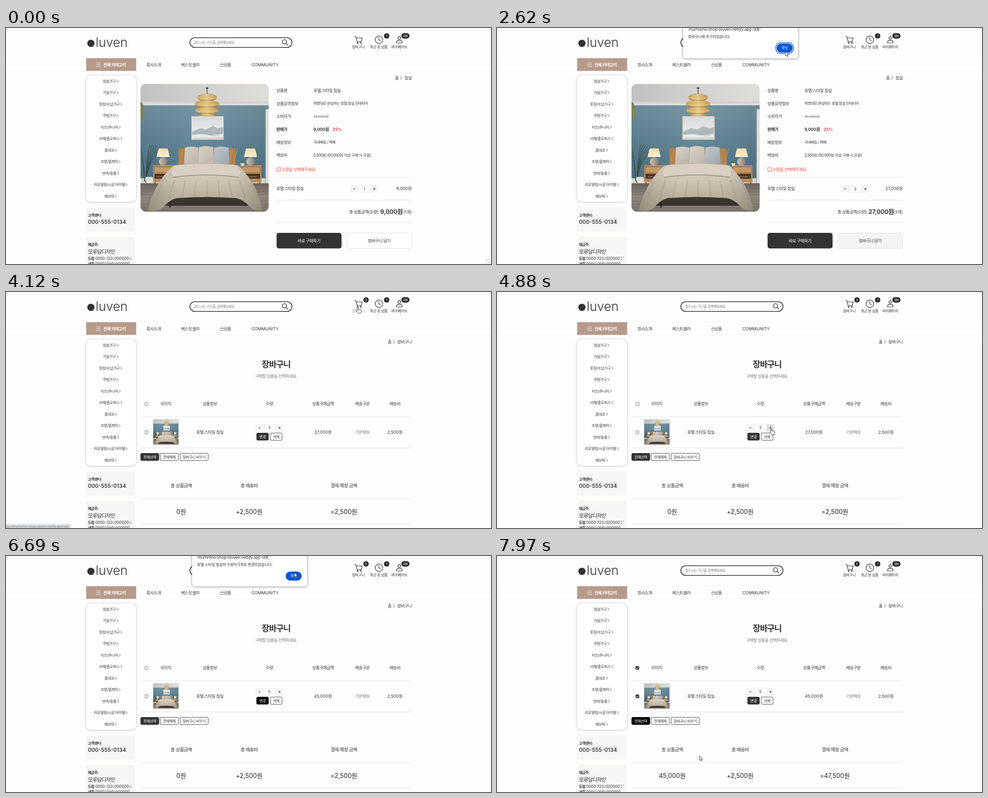
These frames come from a looping animation (1071x523 px, 8 s). An HTML page with a canvas:

```html
<!DOCTYPE html>
<html lang="ko">
<head>
<meta charset="utf-8">
<title>Shop cart demo</title>
<style>
html, body { margin: 0; width: 100%; height: 100%; overflow: hidden; background: #fefefe; }
canvas { display: block; }
</style>
</head>
<body>
<canvas id="stage" width="1071" height="523"></canvas>
<script>
const g = document.getElementById('stage').getContext('2d');
const LOOP = 8000;
const KR = '"Noto Sans CJK KR", "Noto Sans CJK JP", "Noto Sans CJK", sans-serif';
const BODY = 'Inter, ' + KR;
const DIALOG = '"Noto Sans", ' + KR;
const HOST = 'mumreno-shop-oluven.netlify.app';
const INK = '#333';
const ITEM = '호텔 스타일 침실';

// Drawing helpers
function text(s, x, y, size, { c = INK, w = 400, a = 'left', ls = -0.06, f = BODY } = {}) {
  g.font = `${w} ${size}px ${f}`;
  g.letterSpacing = size * ls + 'px';
  g.textAlign = a;
  g.fillStyle = c;
  g.fillText(s, x, y + size * 0.37);
  return g.measureText(s).width;
}
const num = (s, x, y, size, o) => text(s, x, y, size, { ls: 0, ...o });
const mid = (s, x, y, size, o) => text(s, x, y, size, { a: 'center', ...o });

function paint(p, fill, stroke, lw = 1) {
  if (fill) { g.fillStyle = fill; g.fill(p); }
  if (stroke) { g.strokeStyle = stroke; g.lineWidth = lw; g.stroke(p); }
}
function box(x, y, w, h, r, fill, stroke, lw) {
  const p = new Path2D();
  p.roundRect(x, y, w, h, r);
  paint(p, fill, stroke, lw);
}
function oval(x, y, rx, ry, fill, stroke, lw) {
  const p = new Path2D();
  p.ellipse(x, y, rx, ry, 0, 0, Math.PI * 2);
  paint(p, fill, stroke, lw);
}
const path = (d, fill, stroke, lw) => paint(new Path2D(d), fill, stroke, lw);
const chevron = (x, y) => path(`M${x} ${y - 3.2}l3.2 3.2l-3.2 3.2`, null, INK, 0.9);
const rule = (x, y, w, c = '#e2e2e2') => { g.fillStyle = c; g.fillRect(x, y, w, 1); };

function grad(x0, y0, x1, y1, ...colors) {
  const l = g.createLinearGradient(x0, y0, x1, y1);
  colors.forEach((c, i) => l.addColorStop(i / (colors.length - 1), c));
  return l;
}
function shadowBox(x, y, w, h, r, blur, color) {
  g.save();
  g.shadowColor = color;
  g.shadowBlur = blur;
  g.shadowOffsetY = 0.5;
  box(x, y, w, h, r, '#fff');
  g.restore();
}
const won = n => n.toLocaleString('en-US') + '원';
const within = (t, a, b) => t >= a && t < b;

// Timing
const ROUTE = [
  [400, 1054, 521], [820, 825, 358], [960, 825, 358], [1030, 815, 358], [1560, 815, 358],
  [1820, 824, 475], [2080, 824, 475], [2350, 836, 462], [2410, 836, 462], [2600, 637, 52],
  [2770, 637, 52], [3170, 770, 52], [3240, 777, 34], [4120, 777, 34], [4850, 606, 303],
  [5630, 606, 303], [5830, 566, 318], [6150, 566, 318], [6410, 604, 150], [6480, 604, 150],
  [6650, 637, 37], [6810, 637, 37], [7240, 225, 363], [7300, 190, 365], [7560, 309, 363],
  [7910, 309, 363], [7970, 447, 443], [LOOP, 447, 443]
];
const CLICKS = [[1030, 1090], [1220, 1290], [1950, 2020], [2710, 2770], [3580, 3660],
  [5150, 5210], [5290, 5350], [6000, 6070], [6760, 6810], [7690, 7750]];
const HAND = [[790, 1600], [1740, 2080], [3210, 4180], [4780, 5660], [5760, 6150], [7520, 7930]];
const ALERT_1 = [2080, 2770], ALERT_2 = [6150, 6810];
const during = (t, spans) => spans.some(([a, b]) => within(t, a, b));

function pointer(t) {
  const i = ROUTE.findIndex(k => k[0] > t);
  const [t0, x0, y0] = ROUTE[i - 1], [t1, x1, y1] = ROUTE[i];
  const u = (t - t0) / (t1 - t0), e = u * u * (3 - 2 * u);
  return [x0 + (x1 - x0) * e, y0 + (y1 - y0) * e];
}

// Bedroom picture, drawn at its large position
function bedside(x) {
  box(x, 304, 46, 38, 1, '#b88c5c');
  box(x + 3, 308, 40, 12, 0, '#c49a68', '#7d5a38', 0.7);
  box(x + 3, 323, 40, 11, 0, '#4a3728');
  rule(x + 8, 329, 28, '#a89c8c');
  path(`M${x + 4} 342v5m38-5v5`, null, '#59402b', 2);
}
function tableLamp(x) {
  oval(x, 296, 9.5, 9, grad(x - 9, 0, x + 9, 0, '#c9c2b7', '#aaa297', '#857d73'));
  path(`M${x - 10} 267h20l4.5 19h-29z`, grad(0, 267, 0, 286, '#f2dcae', '#fdf0cf'));
}
function pillow(x, w, y, light, dark) {
  path(`M${x + 2} ${y + 2}Q${x + w / 2} ${y - 3} ${x + w - 2} ${y + 2}Q${x + w - 1} ${y + 20} ${x + w} ${y + 39}` +
    `Q${x + w / 2} ${y + 43} ${x} ${y + 39}Q${x + 1} ${y + 20} ${x + 2} ${y + 2}z`,
    grad(x, y, x + w, y + 40, light, dark), 'rgba(110,100,90,.3)', 0.7);
}
function bedroom() {
  box(297, 124, 283, 221, 0, grad(0, 171, 0, 335, '#7393a0', '#66899a', '#587c8d', '#527485'));
  box(297, 171, 283, 164, 0, grad(297, 0, 580, 0, 'rgba(40,65,75,.1)', 'rgba(150,180,190,.14)', 'rgba(40,65,75,.12)'));
  box(297, 124, 283, 44, 0, grad(297, 124, 580, 160, '#c0c1c0', '#d2d1cf', '#e0ded9'));
  box(297, 163, 283, 8, 0, grad(0, 163, 0, 171, '#cccdcb', '#e4e4e1'));
  rule(297, 171, 283, '#8fa0a6');
  box(297, 333, 283, 12, 0, '#d6d6d2');
  box(574, 180, 6, 165, 0, '#dddedb');
  box(572.5, 180, 1.5, 165, 0, '#9aa6a8');
  box(297, 344, 283, 63, 0, grad(0, 344, 0, 407, '#6e655e', '#8e867e', '#7b736b'));
  for (let i = 0; i < 9; i++) rule(297, 348 + i * 7, 283, 'rgba(50,43,39,.18)');

  // Plants
  for (let i = 0; i < 7; i++) {
    path(`M309 343Q${310 + i} ${285 - i} ${318 + i * 5} ${258 + i * i * 0.5}`, null, '#33463f', 0.9);
    path(`M306 340Q304 300 ${298 + i} ${266 + i * 9}`, null, '#39483d', 0.8);
  }
  path('M297 163q7 4 7 16q4 10-2 26l-5-6z', '#7d8359');
  path('M308 330h16l-2 14h-12z', '#e3dfd7');

  // Pendant and framed print
  path('M444 132v17', null, '#333', 1.2);
  oval(444, 133, 3, 1.5, '#333');
  for (let i = 0; i < 4; i++) {
    const y = 154 + i * 14.5, r = [22, 27, 26, 20][i];
    oval(444, y, r, 8, grad(444 - r, 0, 444 + r, 0, '#c79f5c', '#e6c985', '#bd9350'), '#a98142', 0.6);
    path(`M${444 - r} ${y}Q444 ${y + 5} ${444 + r} ${y}`, null, '#f1dda8', 0.8);
    path(`M${447 - r} ${y + 4}Q444 ${y + 9} ${441 + r} ${y + 4}`, null, 'rgba(130,94,42,.5)', 1);
  }
  box(409.5, 195.5, 71, 52, 0, '#e6e8e8', '#b9a58c', 1.2);
  box(411, 197, 68, 49, 0, grad(0, 197, 0, 246, '#d5dadd', '#e4e6e6', '#c8cdcf'));
  path('M411 230l18-8l13 3l14-8l12 5l11-2v14l-30 4l-38-2z', 'rgba(146,158,164,.6)');
  path('M411 238q22-6 38 0t30-3v7l-68 2z', 'rgba(238,240,240,.8)');

  // Furniture
  bedside(325); bedside(518);
  tableLamp(347); tableLamp(540);
  path('M518 299h8l-1 6h-6z', '#f0eee9');
  oval(522, 297, 4, 3, '#53704c');
  box(381, 267, 126, 50, 2, '#b58149');
  for (let i = 0; i < 13; i++) path(`M${382 + i * 10} 303l9-36`, null, '#c99a60', 1);

  // Bed
  box(346, 366, 196, 28, 2, '#3a3330');
  path('M362 376v22M528 376v18', null, '#29221f', 3);
  pillow(393, 34, 263, '#d6d0c7', '#b9b1a6');
  pillow(458, 36, 263, '#c2c9cd', '#99a4ab');
  pillow(424, 36, 262, '#d9d2c8', '#bdb4a8');
  const duvet = 'M370 305Q444 295 514 305Q530 322 545 344Q560 372 566 403Q552 408 540 398Q526 381 508 377' +
    'Q444 372 376 377Q358 383 346 399Q330 409 313 404Q320 374 336 346Q350 322 370 305z';
  path(duvet, grad(0, 300, 0, 405, '#d6cdbe', '#cbc1b0', '#b5ab9a', '#a39988'));
  path(duvet, grad(313, 0, 566, 0, 'rgba(90,80,66,.22)', 'rgba(255,250,238,.1)', 'rgba(255,250,238,.08)', 'rgba(90,80,66,.26)'));
  path('M374 304Q444 296 510 304Q524 320 514 330Q444 320 368 330Q360 318 374 304z', '#d9d0c1', '#aea390', 0.7);
  path('M368 331Q444 321 514 331', null, 'rgba(100,88,72,.35)', 2);
  for (let i = 0; i < 9; i++) {
    const x = 348 + i * 24;
    path(`M${x} 337Q${x - 8 + i * 2} 355 ${x - 16 + i * 4} 378`, null, 'rgba(110,98,82,.14)', 3);
  }
}
function picture(x, y, scale, r) {
  g.save();
  g.translate(x, y);
  g.scale(scale, scale);
  g.translate(-297, -124);
  const clip = new Path2D();
  clip.roundRect(297, 124, 283, 283, r);
  g.clip(clip);
  bedroom();
  g.restore();
}

// Shared page parts
function badge(s, x, w = 12) {
  box(x - w / 2, 11.5, w, 12, 6, '#2b2b2b');
  num(s, x, 17.5, 6.4, { c: '#fff', w: 500, a: 'center' });
}
function header(t) {
  rule(0, 5, 1071, '#e4e4e4');
  rule(0, 66, 1071, '#f3f3f3');
  rule(0, 95, 1071, '#f3f3f3');

  oval(187.5, 34, 8, 8, INK);
  text('luven', 198, 31.6, 28, { w: 300, ls: 0 });

  box(406, 21.5, 225.5, 21.5, 10.75, '#fff', '#2b2b2b', 1.5);
  text('찾으시는 가구를 검색해보세요.', 415, 32.5, 7.7, { c: '#777' });
  oval(615, 30.5, 4.8, 4.8, null, '#222', 1.3);
  path('M618.6 34.2l4 4', null, '#222', 1.4);

  path('M769.5 19h3.2l2.6 11h9.2l1.9-8h-12.8', null, '#222', 1.2);
  oval(776.5, 33, 1.5, 1.5, null, '#222', 1.1);
  oval(783.5, 33, 1.5, 1.5, null, '#222', 1.1);
  oval(823.5, 26, 8.3, 8.3, null, '#222', 1.2);
  path('M823.5 20.5v6l3.2 2', null, '#222', 1.2);
  oval(868.5, 22.2, 3, 3, null, '#222', 1.2);
  path('M862.5 33v-1.5q0-3.8 4-3.8h4q4 0 4 3.8v1.5z', null, '#222', 1.2);
  mid('장바구니', 778, 42, 8.1, { c: within(t, 3240, 4150) ? '#999' : INK });
  mid('최근 본 상품', 823, 42, 8.1);
  mid('마이페이지', 868.5, 42, 8.1);
  badge('1', 840.5);
  badge('ON', 882, 18);
  if (t >= ALERT_1[1]) badge(t < 6480 ? '3' : '5', 795);

  box(177, 67, 110.5, 28, 0, '#b59b8b');
  for (const y of [77, 81, 85]) rule(199, y, 10.5, '#fff');
  text('전체 카테고리', 215, 81.5, 9.3, { c: '#fff', w: 700 });
  text('회사소개', 310, 81.5, 9.3);
  text('베스트셀러', 387, 81.5, 9.3);
  text('신상품', 472.5, 81.5, 9.3);
  num('COMMUNITY', 542, 81.5, 9.4);
}
function sidebar() {
  shadowBox(177, 105, 110, 280, 10, 5, 'rgba(0,0,0,.27)');
  const items = ['침실가구', '거실가구', '옷장/수납가구', '주방가구', '키즈/주니어', '서재/홈오피스',
    '홈데코', '조명/홈케어', '반려/동물', '리모델링/시공 아이템', '패브릭'];
  items.forEach((s, i) => {
    const y = 117.8 + i * 25.5;
    const w = mid(s, 228, y, 8.3);
    chevron(230.2 + w / 2, y);
  });
  box(176, 397, 110, 54, 6, '#f6f6f5');
  text('고객센터:', 181, 414.5, 8.2, { w: 700 });
  num('000-555-0134', 181, 430, 12, { w: 500, c: '#222' });
  box(176, 462, 110, 70, 6, '#f6f6f5');
  text('예금주:', 181, 480, 8.2, { w: 700 });
  text('모루담디자인', 181, 495.5, 11.6, { w: 500, c: '#222' });
  [['두람', '0000-123-000000 /', 511], ['새품', '0000-000-000000', 522.5]].forEach(([bank, no, y]) => {
    text(bank, 181, y, 8.2, { w: 700 });
    num(no, 197, y, 8.4);
  });
}
function crumbs(s) {
  const w = text(s, 896, 110.5, 9.3, { a: 'right' });
  chevron(896 - w - 9, 110.5);
  text('홈', 896 - w - 13, 110.5, 9.3, { a: 'right' });
}
function stepper(x, y, qty, hover) {
  box(x, y, 16.5, 16, 1, '#f4f4f4');
  box(x + 44, y, 16.5, 16, 1, hover ? '#dfdfdf' : '#f4f4f4');
  box(x + 16.5, y + 0.5, 28, 15, 1, '#fff', '#e4e4e4');
  const cy = y + 8;
  path(`M${x + 5.5} ${cy}h5M${x + 50} ${cy}h5m-2.5-2.5v5`, null, '#222', 1);
  num(String(qty), x + 30, cy, 8.4, { a: 'center' });
}

function productPage(t) {
  const qty = 1 + (t >= 1090) + (t >= 1290);
  const total = won(qty * 9000);
  crumbs('침실');
  picture(297, 124, 1, 12);

  ['상품명', '상품요약정보', '소비자가', '판매가', '배송정보', '배송비'].forEach((s, i) =>
    text(s, 597, 138.5 + i * 28.7, 9.3, { w: i === 3 ? 700 : 400 }));
  text(ITEM, 679, 138.5, 9.3);
  text('취향대로 완성하는 호텔 침실 인테리어', 679, 167, 8.2);
  const w = num('12,000원', 679, 196, 8.2, { c: '#888' });
  rule(679, 196, w, '#888');
  num('9,000원', 679, 224.5, 9, { w: 600, c: '#222' });
  num('25%', 721, 224.5, 9.3, { w: 600, c: '#e8312f' });
  text('국내배송 / 택배', 679, 253, 8.2);
  text('2,500원 (50,000원 이상 구매 시 무료)', 679, 282, 8.5);

  box(598, 309, 8.5, 9, 1, null, '#e74c3c', 0.9);
  path('M602.2 311v3.2m0 1v1.2', null, '#e74c3c', 1);
  text('수량을 선택해주세요.', 608, 313.5, 9.4, { c: '#e74c3c' });

  for (const y of [330, 381, 430]) rule(597, y, 299);
  text(ITEM, 597, 356, 9.3);
  stepper(761, 348.5, qty, within(t, 1000, 1600));
  num(total, 896, 356, 9.3, { a: 'right' });

  num(`(${qty}개)`, 896, 407.5, 9.3, { a: 'right' });
  const tw = num(total, 876.5, 407, 13.2, { a: 'right', w: 600, c: '#222' });
  text('총 상품금액(수량):', 874 - tw, 407.5, 9.3, { a: 'right' });

  box(597.5, 454, 143.5, 34.5, 5, INK);
  mid('바로 구매하기', 669, 471.5, 9.3, { c: '#fff', w: 500 });
  box(752.5, 454.5, 143, 34, 5, within(t, 1760, 3240) ? '#f4f4f4' : '#fff', '#e0e0e0');
  mid('장바구니 담기', 824, 471.5, 9.3, { w: 500 });
}

function smallButton(s, x, y, w, fill) {
  box(x + 0.5, y + 0.5, w - 1, 16, 2.5, fill || '#fff', fill || '#444');
  mid(s, x + w / 2, y + 8.5, 8.2, { c: fill ? '#fff' : INK, w: fill ? 500 : 400 });
}
function checkbox(x, y, on) {
  box(x + 0.5, y + 0.5, 7, 7, 1.5, on ? '#222' : '#fff', on ? '#222' : '#777');
  if (on) path(`M${x + 1.8} ${y + 4}l1.7 1.8l3-3.6`, null, '#fff', 1.2);
}
function cartPage(t) {
  const qty = 3 + (t >= 5210) + (t >= 5350);
  const picked = t >= 7750;
  const sum = picked ? qty * 9000 : 0;
  crumbs('장바구니');
  mid('장바구니', 596.5, 160.5, 18.4, { w: 700 });
  mid('구매할 상품을 선택하세요.', 596.5, 186.5, 9.2, { c: '#777' });

  checkbox(306, 244, picked);
  checkbox(306, 307, picked);
  [['이미지', 353], ['상품정보', 450], ['수량', 581.5], ['상품구매금액', 700], ['배송구분', 787], ['배송비', 859]]
    .forEach(([s, x]) => mid(s, x, 248, 9.3, { w: 500 }));
  for (const y of [276, 345, 458, 514]) rule(297, y, 599);

  picture(325, 282, 0.2, 14);
  mid(ITEM, 450, 311, 9.3, { w: 500 });
  stepper(551.5, 293, qty, within(t, 4800, 5680));
  smallButton('변경', 553, 312, 27, within(t, 5780, 6810) ? '#000' : INK);
  smallButton('삭제', 583, 312, 27);
  num(won(qty * 9000), 700, 311, 9.3, { a: 'center' });
  mid('기본배송', 787, 311, 9.3, { c: '#777' });
  num('2,500원', 859, 311, 9.3, { a: 'center' });

  smallButton('전체선택', 297, 357, 41, t >= 7540 ? '#000' : INK);
  smallButton('전체해제', 340, 357, 41);
  smallButton('장바구니 비우기', 384, 357, 63);

  [['총 상품금액', won(sum), 387], ['총 배송비', '+2,500원', 537], ['결제 예정 금액', '=' + won(sum + 2500), 746]]
    .forEach(([label, value, x]) => {
      mid(label, x, 429.5, 10.4);
      num(value, x, 486.5, 13.8, { a: 'center', c: '#222' });
    });
}

// Overlays
function dialog(t, [start, end], message, ring) {
  if (!within(t, start, end)) return;
  g.save();
  g.globalAlpha = Math.min(1, (t - start) / 130 + 0.2);
  shadowBox(411, -12, 254, 79.5, 6, 5, 'rgba(0,0,0,.5)');
  const o = { f: DIALOG, ls: 0, c: '#222' };
  text(HOST + ' 내용:', 423, 3, 8.7, o);
  text(message, 422, 19.5, 8.1, o);
  if (ring) box(615.5, 32.5, 39.5, 24, 12, '#fff', '#0b57d0', 1.5);
  box(617.5, 34.5, 35.5, 20, 10, '#0b57d0');
  text('확인', 635.3, 44.5, 7.5, { f: DIALOG, ls: 0, c: '#fff', a: 'center', w: 500 });
  g.restore();
}
function statusBar() {
  box(-5, 514, 148, 14, 1, '#dfe1e5');
  text(`https://${HOST}/cart`, 139.5, 519.8, 6.9, { f: '"Open Sans", sans-serif', ls: 0, c: '#666', a: 'right' });
}
function cursor(t) {
  if (t < 400) return;
  const [x, y] = pointer(t);
  if (during(t, CLICKS)) oval(x + 0.5, y - 0.5, 7, 7, 'rgba(250,236,20,.85)');
  g.save();
  g.translate(x, y);
  g.lineJoin = 'round';
  if (during(t, HAND)) {
    path('M-1.2 7.5V1Q0-.8 1.2 1V5q1.3-.9 2.2.3q1.3-.7 2.1.5q1.9-.5 1.9 1.4v2.6q0 1.6-1.2 3.5h-5.4' +
      'q-1-2.2-3.3-4.2q-1.6-2 .2-2.2z', '#fff', '#222', 0.9);
  } else {
    path('M0 0v10l2.3-2l1.6 3.4l1.6-.8l-1.5-3.2h3.1z', '#fff', '#222', 0.9);
  }
  g.restore();
}

function draw(t) {
  g.fillStyle = '#fefefe';
  g.fillRect(0, 0, 1071, 523);
  header(t);
  sidebar();
  t < 3660 ? productPage(t) : cartPage(t);
  if (t < 130) {
    g.globalAlpha = t < 70 ? 1 : 0.5;
    box(1060.5, 513.5, 14, 14, 0, '#fff', '#bbb');
    path('M1064 521l3-2l3 2', null, '#888');
    g.globalAlpha = 1;
  }
  if (within(t, 3240, 4150)) statusBar();
  dialog(t, ALERT_1, '장바구니에 추가되었습니다.', true);
  dialog(t, ALERT_2, ITEM + '의 수량이 5개로 변경되었습니다.', t < 6650);
  cursor(t);
}
function tick() {
  draw(performance.now() % LOOP);
  requestAnimationFrame(tick);
}
tick();
</script>
</body>
</html>
```
